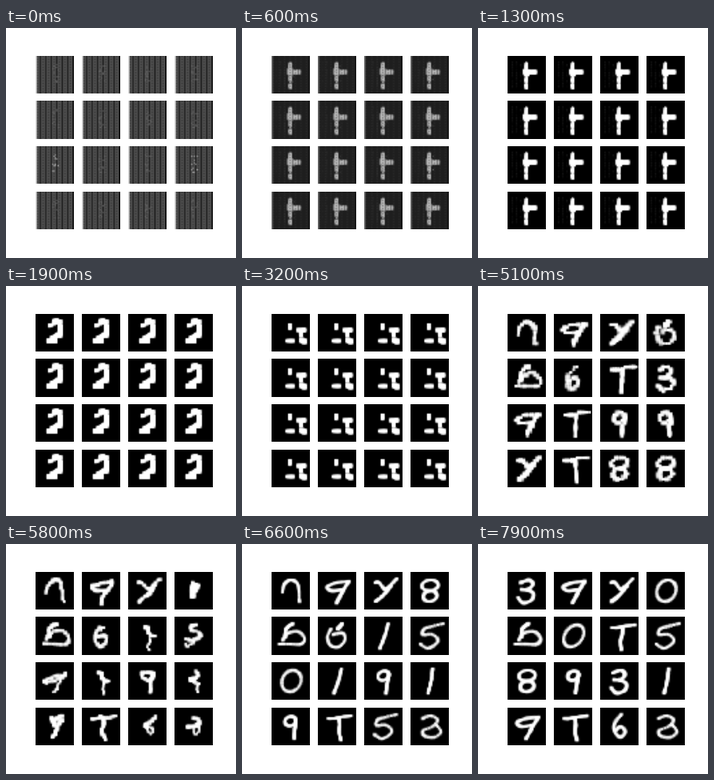
Write an HTML page with a canvas that moves like this. It is 288x288 px and loops after 8 s.

```html
<!DOCTYPE html>
<html lang="en">
<head>
<meta charset="utf-8">
<title>Learning to draw digits</title>
<style>
  html, body { margin: 0; width: 100%; height: 100%; overflow: hidden; background: #fff; }
  canvas { display: block; width: 288px; height: 288px; }
</style>
</head>
<body>
<canvas id="stage" width="288" height="288"></canvas>
<script>
const STEP = 100, STEPS = 80, GRID = 28, SAMPLES = 32;
const stage = document.getElementById("stage").getContext("2d");
const tile = document.createElement("canvas");
tile.width = tile.height = GRID;
const pen = tile.getContext("2d");

const lerp = (a, b, u) => a + (b - a) * u;
const clamp = v => Math.max(0, Math.min(1, v));
const rand = (a, b = 0, c = 0) => {
  const v = Math.sin(a * 12.9898 + b * 78.233 + c * 37.719 + 1.7) * 43758.5453;
  return v - Math.floor(v);
};

// Smooth curve through a few points, sampled evenly.
function smooth(points) {
  const last = points.length - 1;
  const at = i => points[Math.max(0, Math.min(last, i))];
  return Array.from({ length: SAMPLES }, (_, n) => {
    const s = n / (SAMPLES - 1) * last, i = Math.min(last - 1, Math.floor(s)), t = s - i;
    return [0, 1].map(d => {
      const [a, b, c, e] = [at(i - 1)[d], at(i)[d], at(i + 1)[d], at(i + 2)[d]];
      return b + t * (c - a + t * (2 * a - 5 * b + 4 * c - e + t * (3 * (b - c) + e - a))) / 2;
    });
  });
}

// Strokes on the 28-unit grid; `w` scales the pen.
const line = (text, w = 1) => ({ w, pts: smooth(text.split(" ").map(p => p.split(",").map(Number))) });
const loop = (cx, cy, rx, ry) => ({
  w: 1,
  pts: Array.from({ length: SAMPLES }, (_, n) => {
    const a = n / (SAMPLES - 1) * 2 * Math.PI - .8, y = Math.sin(a) * ry;
    return [cx + Math.cos(a) * rx - y * .2, cy + y];
  })
});

const shapes = {
  // early blots, the same in every tile
  a: [line("13.5,5 13.5,9"), line("13,11 14,13", 2), line("15,12 20,12", 1.5), line("13.5,16 13.5,19"), line("13.5,21 13.5,24")],
  b: [line("13,7 15,5 18,6", 1.7), line("10,9 12,8"), line("18,9 18,13 17,16", 1.9), line("16,16 12,18", 1.5), line("9,20 14,20", 1.8)],
  c: [line("13,8 13,11"), line("19,12 24,12", 1.4), line("21,14 21,16", 1.3), line("11,20 16,20", 1.2), line("22,19 24,21", 1.6)],
  // digits and near-digits
  0: [loop(14.5, 14, 7, 8)],
  1: [line("17,5 15,14 12,23")],
  2: [line("9,8 15,6 20,9 16,14 9,17 10,21 17,22 22,18 19,13")],
  3: [line("9,8 15,6 18,9 15,13 10,13"), line("14,13 19,16 18,21 12,23 8,19")],
  5: [line("24,5 16,7 10,9 9,13 16,13 20,17 17,21 12,23 7,20")],
  6: [line("16,5 11,11 10,17 14,22 18,18 15,14 11,17")],
  7: [line("8,8 12,8 17,7 25,6", .9), line("16,8 16,13 15,18 16,24")],
  8: [loop(14.5, 10, 6, 4), loop(14, 18, 5, 4)],
  9: [loop(14, 10, 4, 3.5), line("18,9 17,15 16,23")],
  d: [line("5,20 13,20 21,20 24,16 20,11 12,12 8,17"), line("16,5 11,9 10,15")],
  n: [line("8,15 9,9 13,6 18,8 20,14 21,22")],
  q: [line("23,7 14,8 7,11 10,14 18,13"), line("23,7 19,13 16,18 13,23")],
  u: [line("9,9 7,15 10,21 16,22 20,17 18,12 11,13"), line("17,5 14,9")],
  y: [line("8,8 11,8 15,13 18,11 24,5"), line("20,10 16,15 12,19 8,22")]
};

// What each of the 16 tiles shows, with pen width, raggedness and pixel snapping.
const keys = [
  { step: 13, tiles: "a".repeat(16), width: 1.7, rough: .6, snap: .3 },
  { step: 19, tiles: "b".repeat(16), width: 1.8, rough: .4, snap: .3 },
  { step: 32, tiles: "c".repeat(16), width: 1.8, rough: .7, snap: .4 },
  { step: 51, tiles: "nqyud673q799y788", width: 2.6, rough: .6, snap: .9 },
  { step: 66, tiles: "nqy8du1501919752", width: 2.2, rough: .3, snap: .1 },
  { step: 79, tiles: "3qy0d0758931q762", width: 2.3, rough: .3, snap: 0 }
];

function fill(level, x, y, w, h, alpha = 1) {
  pen.fillStyle = `rgba(${level},${level},${level},${alpha})`;
  pen.fillRect(x, y, w, h);
}

// A stroke without a partner shrinks into the end of the other one.
const vanish = s => ({ pts: s.pts.map(() => s.pts[SAMPLES - 1]), w: 0 });

function strokes(cell, step, a, b, u, alpha) {
  const from = shapes[a.tiles[cell]], to = shapes[b.tiles[cell]];
  const mix = name => lerp(a[name], b[name], u);
  const rough = mix("rough"), snap = mix("snap");
  const alike = step < 40;
  const seed = alike ? 0 : cell;
  const lean = alike ? 0 : (rand(cell, 5) - .5) * .2;
  const sway = Math.sin(Math.PI * u) * .7;
  for (let j = 0; j < Math.max(from.length, to.length); j++) {
    const p = from[j] || vanish(to[j]), q = to[j] || vanish(from[j]);
    const phase = rand(step, seed, j) * 6.28;
    const width = lerp(p.w * a.width, q.w * b.width, u);
    for (let n = 0; n < SAMPLES; n++) {
      const [x, y] = [0, 1].map(d => {
        const v = lerp(p.pts[n][d], q.pts[n][d], u) + sway * Math.sin(n * .25 + phase + d * 2);
        return lerp(v, Math.round(v / 2) * 2, snap);
      });
      const wear = rand(Math.floor(n / 3) + j * 11, seed, step);
      const size = width * (1 + rough * (wear - .5));
      fill(255, x - lean * (y - 14) - size / 2, y - size / 2, size, size, alpha * (1 - rough * wear * .5));
    }
  }
}

function stripes(cell, amount) {
  pen.globalAlpha = amount;
  fill(78, 0, 0, GRID, GRID);
  for (let x = 0; x < GRID; x++) {
    if (x % 4 === 3) fill(32, x, 0, 1, GRID);
    if (x % 4 === 1)
      for (let y = 0; y < GRID; y += 2) fill(56, x, y, 1, 1);
  }
  fill(215, 0, 0, 1, GRID);
  fill(5, GRID - 1, 0, 1, GRID);
  const bright = cell === 8 || cell === 11;
  for (let i = 0; i < 14; i++)
    fill(bright ? 190 : 105, 12 + Math.floor(rand(i, cell, 1) * 5),
      6 + Math.floor(rand(i, cell, 2) * 14), 1, 1, .6);
  pen.globalAlpha = 1;
}

function drawTile(cell, step) {
  const i = Math.max(0, keys.findLastIndex(k => k.step <= step));
  const a = keys[i], b = keys[Math.min(i + 1, keys.length - 1)];
  const u = a === b ? 0 : clamp((step - a.step) / (b.step - a.step));
  fill(0, 0, 0, GRID, GRID);
  if (step > 0) strokes(cell, step, a, b, u, clamp(step / 10));
  const haze = clamp((19 - step) / 6) * .09;
  for (let x = 3; x < 13; x += 3)
    for (let y = 4; y < 24; y += 2) fill(255, x, y, 1, 1.5, haze * rand(x, y, step));
  if (step < 10) stripes(cell, 1 - step / 10);
}

function draw(step) {
  stage.fillStyle = "#fff";
  stage.fillRect(0, 0, 288, 288);
  for (let cell = 0; cell < 16; cell++) {
    const col = cell % 4, row = Math.floor(cell / 4);
    drawTile(cell, step);
    stage.drawImage(tile, 37 + 58 * col, Math.floor(35 + 56.7 * row), 48, row === 1 ? 48 : 47);
  }
}

let shown = -1;
function tick() {
  const step = Math.floor(performance.now() / STEP) % STEPS;
  if (step !== shown) draw(shown = step);
  requestAnimationFrame(tick);
}
tick();
</script>
</body>
</html>
```
